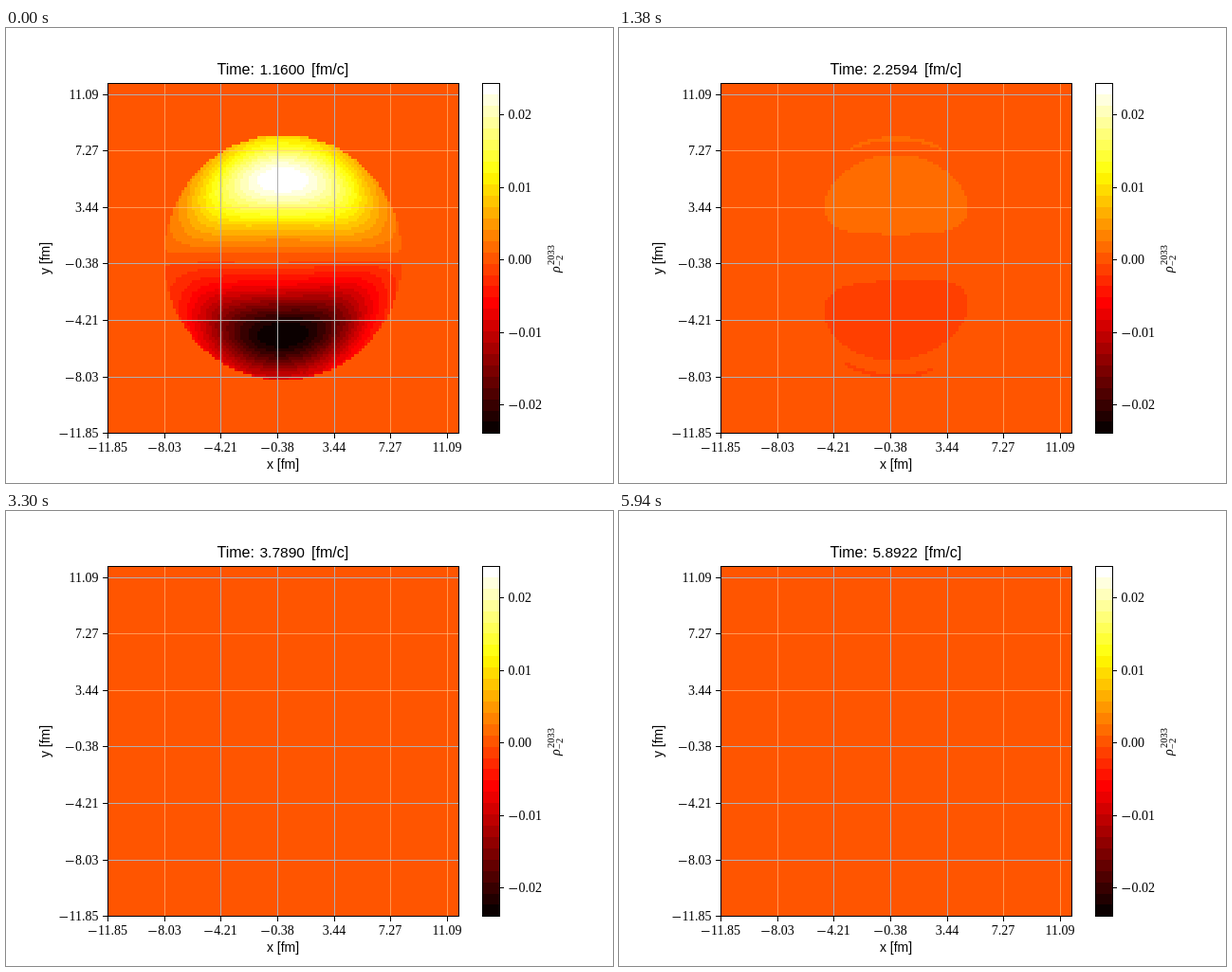
These frames come from a looping animation (640 by 480 pixels, 6 s). An HTML page with a canvas:

```html
<!DOCTYPE html>
<html lang="en">
<head>
<meta charset="utf-8">
<title>Density heat map</title>
<style>
  html, body { margin: 0; width: 100%; height: 100%; overflow: hidden; background: #fff; }
  canvas { display: block; }
</style>
</head>
<body>
<canvas id="stage" width="640" height="480"></canvas>
<script>
const ctx = document.getElementById('stage').getContext('2d');
const SANS = '"Liberation Sans", sans-serif';
const SERIF = '"Liberation Serif", serif';
const STEP = 60, STEPS = 100;
const PLOT = { x: 107, y: 57.6, size: 369.9 };
const BAR = { x: 502, y: 58, w: 18, h: 369.4 };
const BANDS = 31, BAND_VALUE = 0.00156;
const CELLS = 124;
const TICKS = ['-11.85', '-8.03', '-4.21', '-0.38', '3.44', '7.27', '11.09'];
const COLS = TICKS.map((_, i) => Math.round(107 + i * 59.65));
const ROWS = TICKS.map((_, i) => Math.round(427.2 - i * 59.6));

const clamp = (v, lo, hi) => Math.min(hi, Math.max(lo, v));

// Black - red - yellow - white ramp
function hot(p) {
  return [0.0416 + p * 2.624, (p - 0.3723) / 0.381, (p - 0.746) / 0.254]
    .map(c => Math.round(255 * clamp(c, 0, 1)));
}
const palette = Array.from({ length: BANDS }, (_, i) => hot(i / (BANDS - 1)));

const grid = document.createElement('canvas');
grid.width = grid.height = CELLS;
const gridCtx = grid.getContext('2d');
const pixels = gridCtx.createImageData(CELLS, CELLS);

// Two opposite lobes inside a disc, fading and drifting inwards
function fieldAt(time, k) {
  const age = Math.log(time / 1.16);
  const amp = 0.0245 * Math.exp(-4.98 * age + 1.34 * age * age);
  const center = 0.64 - 0.004 * Math.min(k, 23);
  const inner = 0.26 + 0.005 * Math.min(k, 8);
  return (u, v) => {
    const r = Math.hypot(u, v);
    if (r > 1) return 0;
    const h = Math.abs(v);
    const tilt = v < 0 ? 0.05 * u : 0;
    const d = h - (center - 0.35 * u * u - tilt);
    const s = d < 0 ? inner : 0.242;
    const lobe = Math.exp(-d * d / (2 * s * s) - 1.65 * u * u - u ** 4) * Math.tanh(h / 0.08);
    const rim = r > 0.955 && r < 0.985 ? 0.00055 * h * h : 0;
    return Math.sign(v) * (amp * lobe + rim);
  };
}

function drawField(time, k) {
  const field = fieldAt(time, k), cell = PLOT.size / CELLS, mid = (BANDS - 1) / 2;
  for (let j = 0, n = 0; j < CELLS; j++) {
    const v = (242 - PLOT.y - (j + 0.5) * cell) / 129;
    for (let i = 0; i < CELLS; i++, n += 4) {
      const u = (PLOT.x + (i + 0.5) * cell - 292) / 126;
      const band = clamp(mid + Math.round(field(u, v) / BAND_VALUE), 0, BANDS - 1);
      pixels.data.set(palette[band], n);
      pixels.data[n + 3] = 255;
    }
  }
  gridCtx.putImageData(pixels, 0, 0);
  ctx.imageSmoothingEnabled = false;
  ctx.drawImage(grid, PLOT.x, PLOT.y, PLOT.size, PLOT.size);
}

function rect(color, x, y, w, h) {
  ctx.fillStyle = color;
  ctx.fillRect(x, y, w, h);
}

function text(str, x, y, font, align = 'left') {
  ctx.fillStyle = '#000';
  ctx.font = font;
  ctx.textAlign = align;
  ctx.fillText(str, x, y);
}

function turned(x, y, draw) {
  ctx.save();
  ctx.translate(x, y);
  ctx.rotate(-Math.PI / 2);
  draw();
  ctx.restore();
}

// Number with a long math minus; anchor is 0 left, 0.5 centre, 1 right
function number(str, x, y, anchor) {
  const digits = str.replace('-', ''), minus = digits === str ? 0 : 11;
  ctx.font = '14px ' + SERIF;
  const left = x - anchor * (ctx.measureText(digits).width + minus);
  if (minus) rect('#000', left + 1, Math.round(y - 4), 8.5, 0.9);
  text(digits, left + minus, y, '14px ' + SERIF);
}

function frame(x, y, w, h) {
  ctx.strokeStyle = '#000';
  ctx.lineWidth = 1;
  ctx.strokeRect(x + 0.5, y + 0.5, w, h);
}

function drawAxes() {
  const strong = '#b0b0b0', faint = 'rgba(255,200,140,.6)';
  COLS.forEach((x, i) => {
    if (i) rect([1, 5, 6].includes(i) ? faint : strong, x, 58, 1, 369);
    rect('#000', x, 428, 1, 5);
    number(TICKS[i], x, 447, 0.5);
  });
  ROWS.forEach((y, i) => {
    if (i) rect([4, 5].includes(i) ? faint : strong, 107, y, 370, 1);
    rect('#000', 102, y, 5, 1);
    number(TICKS[i], 97.5, y + 5, 1);
  });
  frame(107, 58, 370, 369);
  text('x [fm]', 292, 465, '14px ' + SANS, 'center');
  turned(46, 243, () => text('y [fm]', 0, 0, '14px ' + SANS, 'center'));
}

function drawBar() {
  const h = BAR.h / BANDS;
  palette.forEach((c, i) => {
    const top = Math.round(BAR.y + BAR.h - (i + 1) * h);
    const end = Math.round(BAR.y + BAR.h - i * h);
    rect(`rgb(${c})`, BAR.x, top, BAR.w, end - top);
  });
  frame(BAR.x, 58, BAR.w, 369);
  ['0.02', '0.01', '0.00', '-0.01', '-0.02'].forEach((label, i) => {
    const y = Math.round(91 + i * 76.6);
    rect('#000', 521, y, 4, 1);
    number(label, 529.5, y + 5, 0);
  });
  turned(584, 258, () => {
    text('ρ', 0, 0, 'italic 14px ' + SERIF);
    text('2033', 8, -6, '10.5px ' + SERIF);
    text('−2', 7, 3, '10.5px ' + SERIF);
  });
}

function draw(k) {
  const time = 1.16 + 0.0478 * k;
  rect('#fff', 0, 0, 640, 480);
  drawField(time, k);
  drawAxes();
  drawBar();
  text('Time:', 222.5, 49, '16px ' + SANS);
  text(time.toFixed(4), 267.5, 49, '15.5px ' + SANS);
  text('[fm/c]', 322, 49, '16px ' + SANS);
}

let shown = -1;
function tick() {
  const k = Math.floor(performance.now() / STEP) % STEPS;
  if (k !== shown) draw(shown = k);
  requestAnimationFrame(tick);
}
tick();
</script>
</body>
</html>
```
